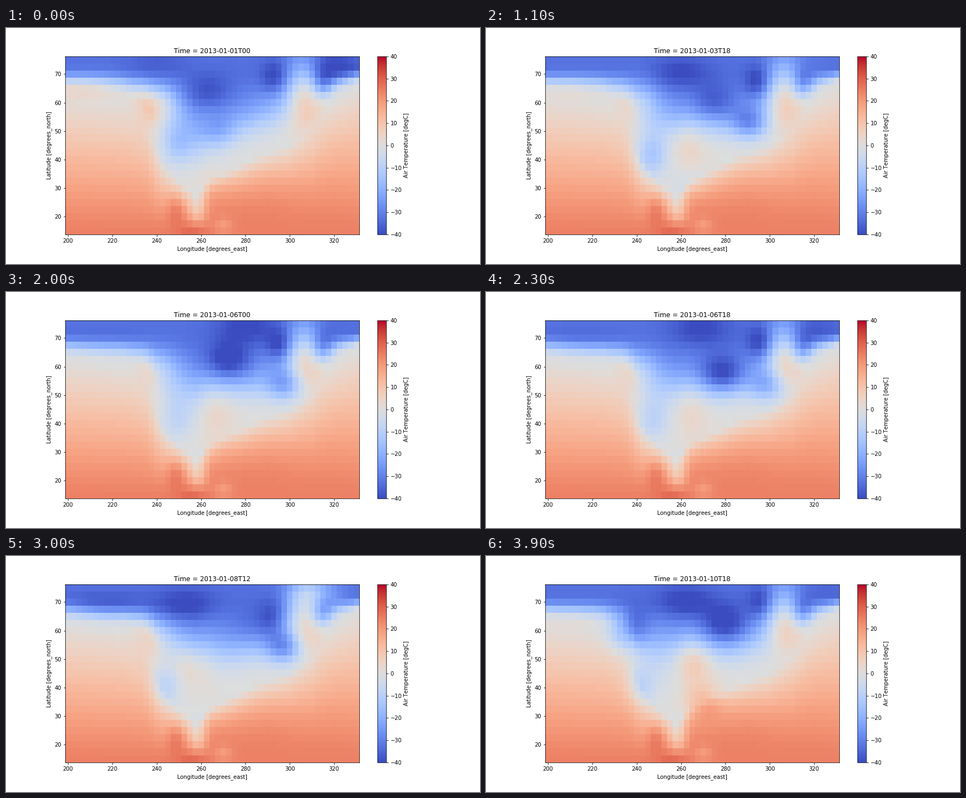
A matplotlib script that plays this animation: 864 px wide and 432 px high, repeating every 4000 ms.

```python
import numpy as np
import matplotlib.pyplot as plt
from matplotlib.animation import FuncAnimation

FRAMES, INTERVAL = 40, 100
LON = np.arange(200, 331, 2.5)
LAT = np.arange(15, 76, 2.5)
X, Y = np.meshgrid(LON, LAT)

# Latitude of the freezing line along the map: (lon, lat).
FREEZING = [(200, 62), (225, 60), (234, 57), (238, 50), (241, 42), (246, 36),
            (252, 31), (258, 28), (264, 33), (275, 37), (285, 41), (300, 45),
            (310, 51), (316, 57), (322, 62), (330, 66)]

# How late the warm side drops towards the freezing line: (lon, exponent).
STEEPNESS = [(200, 1.2), (240, 1.2), (256, 1.6), (264, 3), (290, 2.5), (310, 1.7), (330, 1.3)]

# Lasting features: (lon, lat, degrees, width, height).
FEATURES = [
    (280, 57, -7, 12, 6),      # Hudson Bay
    (306, 65, 22, 5.5, 8),     # Davis Strait
    (315, 66, -10, 3, 3.5),    # Greenland
    (259, 22, -9, 2.8, 4),     # Mexican plateau
    (249, 23, 7, 3, 4),        # Gulf of California
    (257, 15, 5, 4, 2),        # Pacific coast
    (270, 17, -5, 3, 2),       # Guatemala
]

# Air masses: size, then a track of (step, lon, lat, degrees).
AIR_MASSES = {
    "Quebec": ((6, 4), [(0, 268, 50, -9), (6, 285, 51, -18), (15, 296, 54, -21),
                        (26, 301, 53, -16), (30, 298, 54, -22), (39, 306, 53, -3)]),
    "Manitoba": ((7, 4.5), [(0, 263, 63, -9), (6, 275, 57, -10), (15, 275, 62, -8),
                            (20, 272, 62, -14), (26, 286, 52, -20), (30, 288, 62, -6),
                            (39, 280, 62, -14)]),
    "Baffin": ((4, 4), [(0, 293, 69, -9), (15, 295, 66, -12), (26, 296, 69, -11),
                        (30, 292, 65, -6), (39, 296, 70, -9)]),
    "Arctic": ((9, 4), [(0, 240, 73, -4), (6, 255, 71, -7), (15, 264, 70, -8),
                        (20, 280, 74, -8), (26, 257, 73, -8), (30, 253, 69, -9),
                        (39, 262, 70, -9)]),
    "Yukon": ((6, 5), [(0, 241, 60, 18), (6, 241, 61, 13), (15, 242, 61, 9),
                       (30, 240, 58, 8), (39, 236, 60, -17)]),
    "Rockies": ((5, 5), [(0, 249, 45, -11), (6, 247, 42, -13), (15, 247, 41, -14),
                         (20, 249, 41, -7), (26, 246, 41, -10), (39, 242, 41, -9)]),
    "Plains": ((7, 6), [(0, 262, 48, -4), (6, 259, 46, 10), (20, 266, 46, 7),
                        (30, 255, 48, 11), (39, 265, 50, 16)]),
    "Texas": ((6, 4), [(0, 265, 32, 3), (6, 262, 33, -5), (20, 268, 33, 2),
                       (30, 265, 34, 0), (39, 270, 35, 12)]),
    "Greenland": ((8, 4), [(0, 320, 72, -9), (15, 315, 74, 5), (26, 323, 72, -8),
                           (30, 311, 73, 14), (39, 326, 73, -2)]),
    "Alaska": ((14, 3), [(0, 208, 66.5, 9), (6, 210, 66, 9), (30, 218, 68, -9),
                         (39, 212, 66, 3)]),
}


def along(x, keys):
    """Linear path through key points; one result for each value after the first."""
    pos, *values = zip(*keys)
    return [np.interp(x, pos, v) for v in values]


def blob(lon, lat, degrees, width, height):
    return degrees * np.exp(-(((X - lon) / width) ** 2 + ((Y - lat) / height) ** 2) / 2)


def climate():
    """Warm tropics falling to the freezing line, then an eased drop to the Arctic."""
    line, = along(X, FREEZING)
    power, = along(X, STEEPNESS)
    south = np.clip((Y - 15) / (line - 15), 0, 1)
    north = np.clip((Y - line) / (72 - line), 0, 1)
    ease = north ** 2 * (3 - 2 * north)
    return 24.5 * (1 - south ** power) - 33 * ease ** 1.4


base = climate() + sum(blob(*feature) for feature in FEATURES)


def temperature(i):
    temps = base.copy()
    for size, track in AIR_MASSES.values():
        temps += blob(*along(i, track), *size)
    return np.clip(temps, -41, 30)


def stamp(i):
    return f"Time = 2013-01-{1 + i // 4:02d}T{6 * (i % 4):02d}"


plt.rcParams.update({"font.family": "DejaVu Sans", "font.size": 10,
                     "text.kerning_factor": 6})
fig, ax = plt.subplots(figsize=(12, 6), dpi=72)
fig.subplots_adjust(left=0.125, right=0.9, bottom=0.125, top=0.88)

mesh = ax.pcolormesh(np.append(LON, 332.5) - 1.25, np.append(LAT, 77.5) - 1.25,
                     temperature(0), cmap="coolwarm", vmin=-40, vmax=40)
fig.colorbar(mesh, ax=ax, ticks=range(-40, 41, 10), label="Air Temperature [degC]")
ax.set_xlabel("Longitude [degrees_east]")
ax.set_ylabel("Latitude [degrees_north]")
title = ax.set_title(stamp(0), fontsize=12)


def update(i):
    mesh.set_array(temperature(i))
    title.set_text(stamp(i))
    return mesh, title


anim = FuncAnimation(fig, update, frames=FRAMES, interval=INTERVAL, repeat=True)
plt.show()
```
